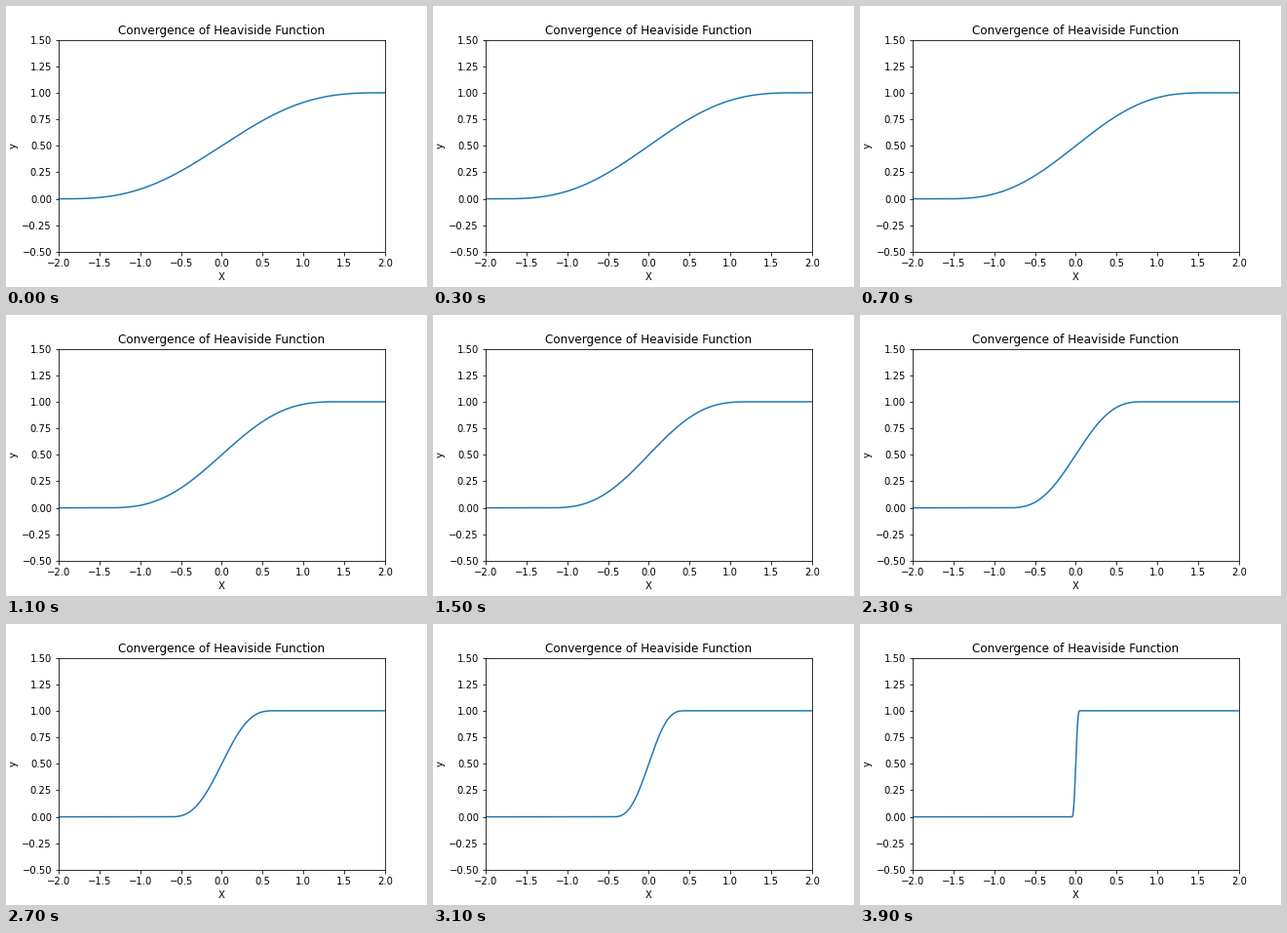
These frames come from a looping animation (432x288 px, 4 s). A matplotlib script:

```python
import numpy as np
import matplotlib.pyplot as plt
from matplotlib.animation import FuncAnimation

FRAMES = 40
INTERVAL = 100
START_WIDTH = 2.0

plt.rcParams.update({"font.family": "DejaVu Sans", "font.size": 10})


def smooth_step(x, width):
    """Heaviside step smoothed over -width..width."""
    u = np.clip(x / width, -1, 1)
    return 0.5 * (1 + u + np.sin(np.pi * u) / np.pi)


fig = plt.figure(figsize=(6, 4), dpi=72, facecolor="white")
fig.subplots_adjust(left=0.125, right=0.9, bottom=0.125, top=0.88)
ax = fig.add_subplot()
ax.set(xlim=(-2, 2), ylim=(-0.5, 1.5), xlabel="X", ylabel="y",
       xticks=np.arange(-2, 2.1, 0.5), yticks=np.arange(-0.5, 1.6, 0.25))
ax.set_title("Convergence of Heaviside Function", fontsize=12)

x = np.linspace(-2, 2, 1000)
line, = ax.plot(x, smooth_step(x, START_WIDTH), color="#1f77b4", lw=1.5)


def update(i):
    width = START_WIDTH * (1 - i / FRAMES)
    line.set_ydata(smooth_step(x, width))
    return line,


anim = FuncAnimation(fig, update, frames=FRAMES, interval=INTERVAL,
                     repeat=True, repeat_delay=0)
plt.show()
```
